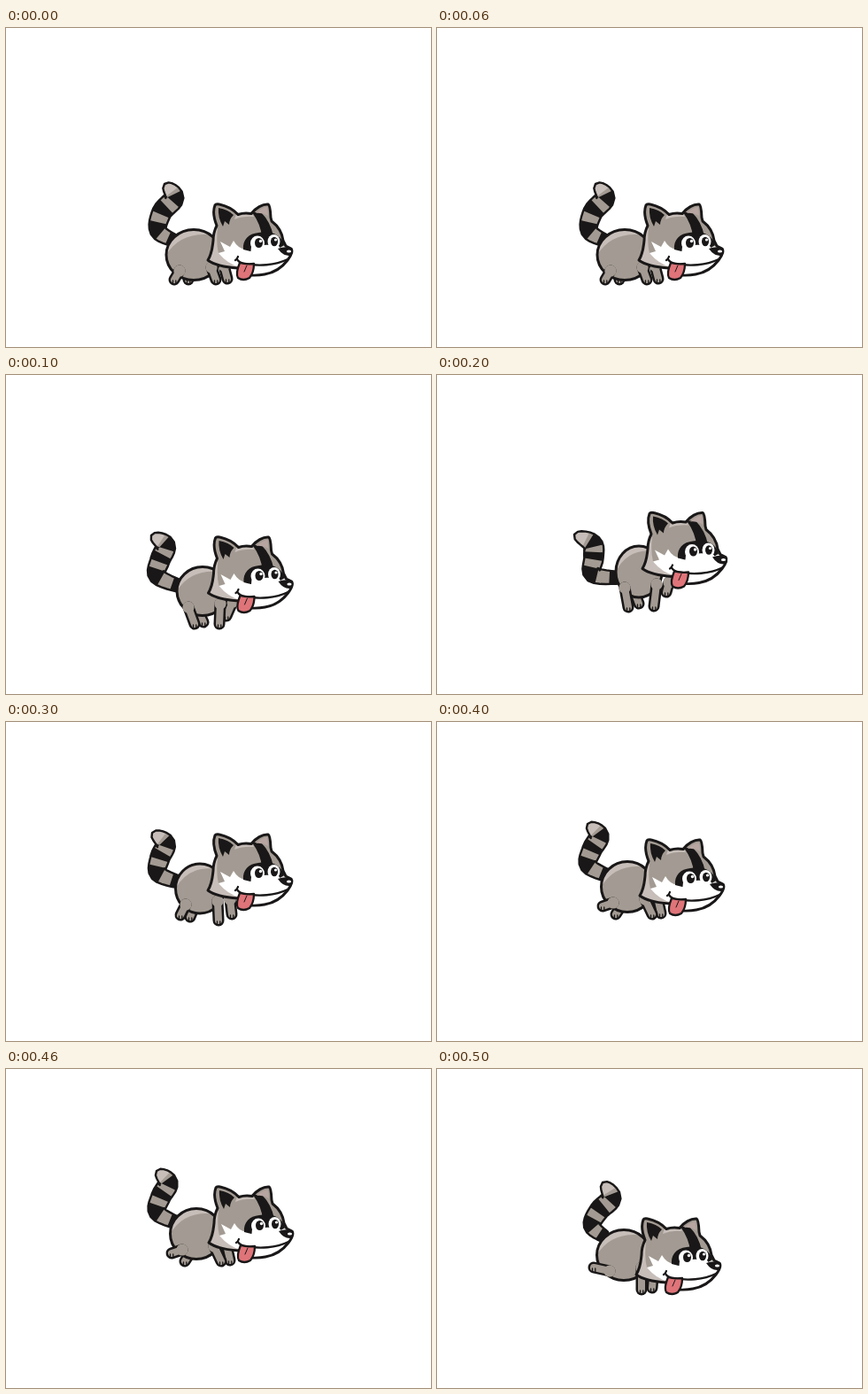
An HTML page that plays this animation: 480 px wide and 360 px high, repeating every 600 ms.

```html
<!DOCTYPE html>
<html lang="en">
<head>
<meta charset="utf-8">
<title>Running raccoon</title>
<style>
  html, body { margin: 0; width: 100%; height: 100%; overflow: hidden; background: #fff; }
  #strip { display: block; width: 2880px; height: 360px; animation: run 600ms steps(6) infinite; }
  @keyframes run { to { transform: translateX(-2880px); } }
  .ink { fill: #191717; }
  .fur { fill: #a39b93; }
  .light { fill: #c7beb9; }
  .white { fill: #fff; }
  .line { fill: none; stroke: #191717; stroke-linecap: round; stroke-linejoin: round; }
  .limb { fill: none; stroke-linecap: round; }
</style>
</head>
<body>
<svg id="strip" viewBox="0 0 2880 360" xmlns="http://www.w3.org/2000/svg">
  <defs>
    <path id="skull" d="M228 262C233 254 233 248 234 240C234 232 236 227 238 223C234 213 234 205 236 200Q237 198 241 199C250 201 257 205 262 210.500Q269 208 277 209.500C282 203 290 198.500 296 199Q298.500 200 299 214L300 218C308 224 312 232 313 240L316 246L322 249Q325 253 318 262C312 270 304 276 292 278Q285 279.500 276 279L262 271C248 270 236 268 228 262Z"/>
    <clipPath id="skullClip"><use href="#skull"/></clipPath>
    <g id="head">
      <use href="#skull" class="fur"/>
      <g clip-path="url(#skullClip)">
        <path class="light" d="M226 262Q233 250 234 228L239 226Q237 242 240 254L262 267L264 273Q240 272 226 262Z"/>
        <path class="light" d="M260 210Q270 208 278 210L280 213Q268 212 258 216Z"/>
        <path class="white" d="M240 254L247 252L242 241L253 247L257 240Q262 249 271 250Q290 255 308 247L316 246L322 257Q312 270 300 277L278 280L264 270Q250 266 240 254Z"/>
        <path class="ink" d="M278 208L288 208Q299 219 302 235L289 236Q288 222 278 208Z"/>
        <path class="ink" d="M268 250C267 239 274 232 285 231C297 229 310 231 314 245L308 249Q290 254 276 252Z"/>
      </g>
      <path class="ink" d="M240 203Q251 205 257 211Q252 216 252 222L247 218L245 224Q239 214 240 203Z"/>
      <path fill="#b7a5a1" d="M282 209Q288 203 295 202L296 212Q289 208 282 209Z"/>
      <ellipse class="white" cx="284" cy="243" rx="8" ry="8.500"/>
      <ellipse class="white" cx="302.500" cy="241" rx="7" ry="8"/>
      <path class="white" d="M277 247Q292 243 308 246L312 251Q300 258 276 256Z"/>
      <ellipse class="ink" cx="285.500" cy="242.500" rx="4.500" ry="5.500"/>
      <ellipse class="ink" cx="303" cy="241" rx="4" ry="5.200"/>
      <circle class="white" cx="287.500" cy="240.500" r="1.700"/>
      <circle class="white" cx="304.500" cy="239" r="1.600"/>
      <use href="#skull" class="line" stroke-width="3"/>
      <path class="ink" d="M307 249Q314 246 322 248Q326 251 321 257Q313 258 307 249Z"/>
      <ellipse class="white" cx="319.500" cy="252" rx="2.600" ry="1.500"/>
      <path class="line" stroke-width="2.300" d="M259 262Q261 261 262 258M261 261Q263 265 270 266C285 269 304 268 318 261"/>
      <path class="line" style="fill:#df7479" stroke-width="2.300" d="M264 265Q271 267 280 266Q280 276 275 282Q268 286 262 282Q259 277 264 265Z"/>
      <path class="line" stroke="#191717" stroke-width="1" d="M272 268L269 275"/>
    </g>
  </defs>
</svg>
<script>
const strip = document.getElementById('strip');
const INK = '#191717', FUR = '#a39b93';

// head: offset; body: centre and radii; feet: hind far, hind near, front far, front near;
// tail: centre line from root to tip
const poses = [
  { head: [0, 0], body: [212, 256, 31, 28.5], feet: [206, 284, 190, 284, 250, 283, 237, 284],
    tail: [190, 240, 172, 229, 176, 208, 190, 191, 179, 176] },
  { head: [.5, -16], body: [222, 244, 29, 27.5], feet: [223, 279, 213, 281, 249, 272, 241, 281],
    tail: [198, 239, 171, 227, 174, 209, 180, 192, 164, 181] },
  { head: [4, -43.5], body: [228, 222, 26, 29], feet: [228, 258, 216, 262, 259, 245, 245, 261],
    tail: [206, 229, 176, 225, 177, 206, 175, 190, 155, 180] },
  { head: [0, -72], body: [219, 188, 27.5, 28], feet: [208, 220, 197, 218, 255, 217, 240, 224],
    tail: [196, 181, 172, 171, 174, 153, 180, 137, 165, 125] },
  { head: [1, -66], body: [215, 186, 29.5, 28.5], feet: [202, 217, 187, 208, 253, 216, 243, 217],
    tail: [194, 174, 171, 162, 175, 144, 183, 128, 170, 115] },
  { head: [-3, -30], body: [211, 210, 30.5, 28.5], feet: [206, 228, 177, 224, 243, 247, 231, 249],
    tail: [189, 189, 175, 177, 183, 160, 197, 145, 187, 128] }
];
const hips = [[-6, 20], [-16, 18], [34, 12], [20, 14]];

function add(parent, tag, attrs) {
  const el = document.createElementNS('http://www.w3.org/2000/svg', tag);
  for (const key in attrs) el.setAttribute(key, attrs[key]);
  return parent.appendChild(el);
}

function spline(p, t) {
  const n = p.length / 2 - 1;
  const i = Math.min(n - 1, Math.floor(t * n)), u = t * n - i;
  const axis = k => {
    const at = j => p[2 * Math.max(0, Math.min(n, j)) + k];
    const a = at(i - 1), b = at(i), c = at(i + 1), d = at(i + 2);
    return b + .5 * u * (c - a + u * (2 * a - 5 * b + 4 * c - d + u * (3 * (b - c) + d - a)));
  };
  return [axis(0), axis(1)];
}

const halfWidth = t => t < .65
  ? 6.5 + 4.5 * Math.sin(t / .65 * Math.PI / 2)
  : 11 * Math.pow(Math.max(0, 1 - Math.pow((t - .65) / .35, 2)), .6);

function band(line, from, to) {
  const left = [], right = [], steps = 24;
  for (let i = 0; i <= steps; i++) {
    const t = from + (to - from) * i / steps;
    const [x, y] = spline(line, t);
    const [ax, ay] = spline(line, Math.max(0, t - .01));
    const [bx, by] = spline(line, Math.min(1, t + .01));
    const k = halfWidth(t) / Math.hypot(bx - ax, by - ay);
    const dx = (ay - by) * k, dy = (bx - ax) * k;
    left.push([x + dx, y + dy]);
    right.unshift([x - dx, y - dy]);
  }
  return 'M' + left.concat(right).map(p => p.map(v => v.toFixed(1)).join(' ')).join('L') + 'Z';
}

function drawTail(g, line) {
  const shape = band(line, 0, 1);
  add(g, 'path', { d: shape, class: 'fur' });
  add(g, 'path', { d: band(line, .84, .97), class: 'light' });
  for (const [a, b] of [[0, .1], [.2, .37], [.47, .59], [.68, .8]])
    add(g, 'path', { d: band(line, a, b), class: 'ink' });
  add(g, 'path', { d: shape, class: 'line', 'stroke-width': 2.4 });
}

function drawLeg(g, pose, i) {
  const x = pose.feet[2 * i], y = pose.feet[2 * i + 1];
  const hx = pose.body[0] + hips[i][0], hy = pose.body[1] + hips[i][1];
  const d = `M${hx} ${hy}L${x} ${y}`;
  add(g, 'path', { d, class: 'limb', stroke: INK, 'stroke-width': 13 });
  add(g, 'circle', { cx: hx, cy: hy, r: 6.6, class: 'fur' });
  add(g, 'path', { d, class: 'limb', stroke: FUR, 'stroke-width': 8 });
  add(g, 'path', { d: `M${x - 1.5} ${y + 1}v4M${x + 1.8} ${y + 1}v4`, class: 'line', 'stroke-width': 1.3 });
}

poses.forEach((pose, i) => {
  const g = add(strip, 'g', { transform: `translate(${480 * i} 0)` });
  const [cx, cy, rx, ry] = pose.body;
  drawTail(g, pose.tail);
  drawLeg(g, pose, 0);
  drawLeg(g, pose, 2);
  add(g, 'ellipse', { cx, cy, rx, ry, class: 'fur' });
  add(g, 'path', {
    class: 'light',
    d: `M${cx - rx} ${cy}A${rx} ${ry} 0 0 1 ${cx + rx * .6} ${cy - ry * .8}`
      + `Q${cx - rx * .5} ${cy - ry * .9} ${cx - rx} ${cy}Z`
  });
  add(g, 'ellipse', { cx, cy, rx, ry, class: 'line', 'stroke-width': 3 });
  drawLeg(g, pose, 1);
  drawLeg(g, pose, 3);
  add(g, 'use', { href: '#head', transform: `translate(${pose.head})` });
});
</script>
</body>
</html>
```
